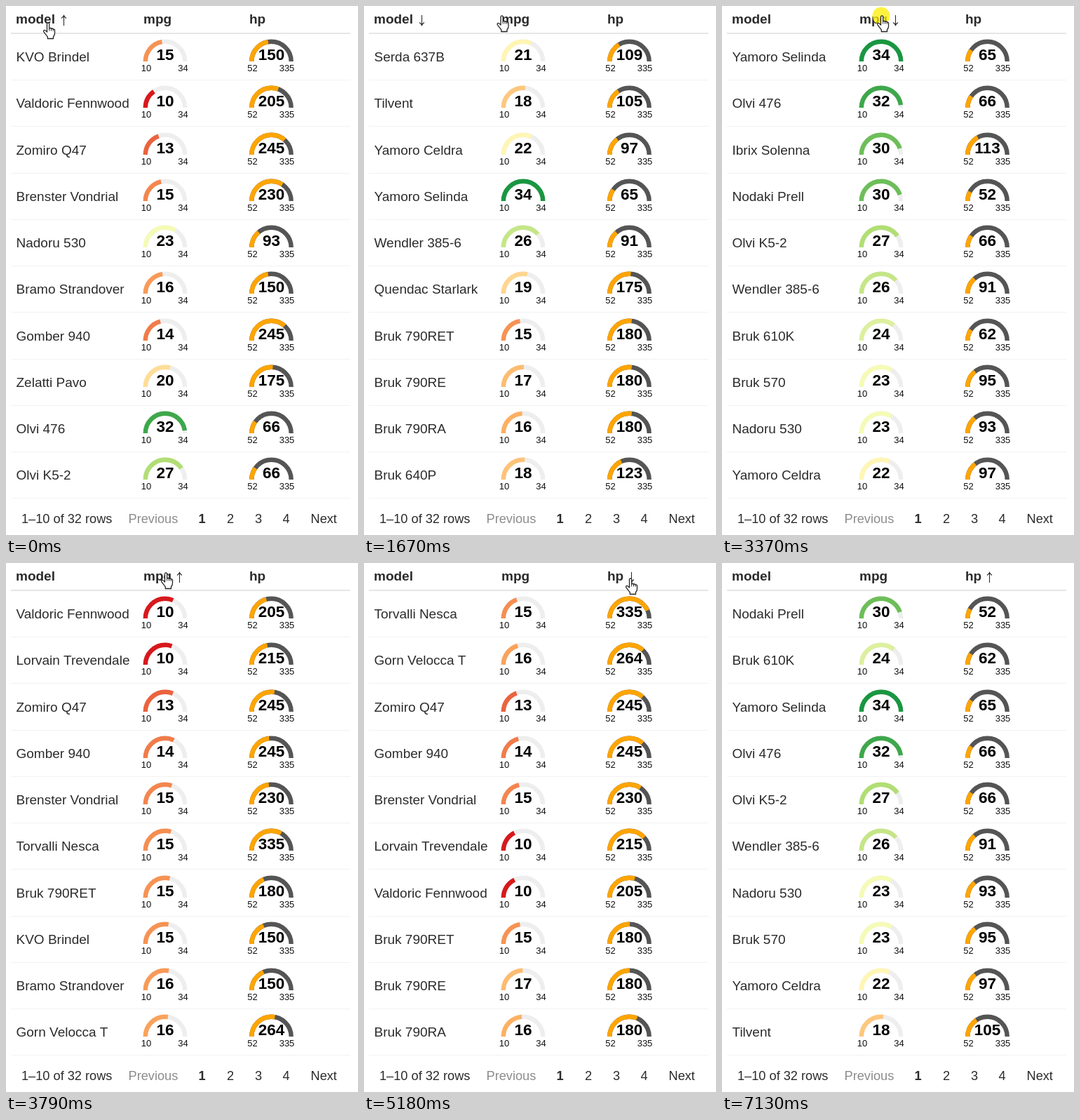
An HTML page with a canvas for the animation above (7.46 s loop, 502 by 754 pixels).

```html
<!DOCTYPE html>
<html lang="en">
<head>
<meta charset="utf-8">
<title>Sortable gauge table</title>
<style>
  html, body { margin: 0; width: 100%; height: 100%; overflow: hidden; background: #fff; }
  canvas { display: block; }
</style>
</head>
<body>
<canvas id="stage" width="502" height="754"></canvas>
<script>
const ctx = document.getElementById('stage').getContext('2d');
const LOOP = 7460;
const ROW_HEIGHT = 66.25;
const INK = '#2b2b2b';

// Alphabetical by the shown column order; decimals also settle ties when sorting.
const cars = [
  ['KVO Brindel', 15.21, 150], ['Valdoric Fennwood', 10.4, 205],
  ['Zomiro Q47', 13.3, 245.1], ['Brenster Vondrial', 14.7, 230],
  ['Nadoru 530', 22.8, 93], ['Bramo Strandover', 15.5, 150],
  ['Gomber 940', 14.3, 245], ['Zelatti Pavo', 19.7, 175],
  ['Olvi 476', 32.4, 66], ['Olvi K5-2', 27.3, 66],
  ['Gorn Velocca T', 15.8, 264], ['Nodaki Prell', 30.4, 52],
  ['Lorvain Trevendale', 10.4, 215], ['Ibrix Solenna', 30.4, 113],
  ['Torvalli Nesca', 15, 335], ['Bruk 570', 22.8, 95],
  ['Bruk 610K', 24.4, 62], ['Bruk 640P', 17.8, 123],
  ['Bruk 790RA', 16.4, 180], ['Bruk 790RE', 17.3, 180],
  ['Bruk 790RET', 15.2, 180], ['Quendac Starlark', 19.2, 175],
  ['Wendler 385-6', 26, 91], ['Yamoro Selinda', 33.9, 65],
  ['Yamoro Celdra', 21.5, 97], ['Tilvent', 18.1, 105],
  ['Serda 637B', 21.4, 109]
].map(([name, mpg, hp], model) => ({ name, model, mpg, hp }));

const columns = {
  model: { x: 14, arrowX: 82.5 },
  mpg: { x: 196, arrowX: 247.5, center: 227, min: 10, max: 33.9, track: '#eee' },
  hp: { x: 347, arrowX: 381.5, center: 378.5, min: 52, max: 335, track: '#555' }
};

function sorted(key, descending) {
  const rows = [...cars].sort((a, b) => a[key] - b[key]);
  if (descending) rows.reverse();
  return rows.slice(0, 10);
}

const states = [
  [0, 'model', false], [390, 'model', true], [2080, 'mpg', true],
  [3480, 'mpg', false], [4800, 'hp', true], [6140, 'hp', false]
].map(([time, key, descending]) => ({ time, key, descending, rows: sorted(key, descending) }));

const clicks = [270, 1980, 3370, 4690, 6080];
const CLICK_LENGTH = 140;

// time, x, y of the pointer's upper left corner
const pointerPath = [
  [1100, 53, 23], [1670, 189.5, 13], [1880, 221, 13], [3850, 221, 13],
  [4070, 250, 26], [4430, 373, 21], [6550, 373, 21], [6920, 425, 52], [7120, 503, 100]
];

const mix = (a, b, p) => a + (b - a) * p;
const clamp = p => Math.max(0, Math.min(1, p));

// CSS "ease": cubic-bezier(.25, .1, .25, 1)
function ease(p) {
  if (p <= 0 || p >= 1) return clamp(p);
  const bezier = (a, b, u) => 3 * a * u * (1 - u) ** 2 + 3 * b * u * u * (1 - u) + u ** 3;
  let low = 0, high = 1;
  for (let i = 0; i < 20; i++) {
    const mid = (low + high) / 2;
    if (bezier(.25, .25, mid) < p) low = mid; else high = mid;
  }
  return bezier(.1, 1, low);
}

const ramp = [[215, 25, 28], [253, 174, 97], [255, 255, 191], [166, 217, 106], [26, 150, 65]];
function mpgColor(mpg) {
  const pos = clamp((mpg - 10.4) / 23.5) * 4;
  const i = Math.min(3, Math.floor(pos));
  return `rgb(${ramp[i].map((c, k) => Math.round(mix(c, ramp[i + 1][k], pos - i)))})`;
}

function text(string, x, y, size, { color = INK, bold = false, align = 'left' } = {}) {
  ctx.font = `${bold ? 'bold ' : ''}${size}px "Liberation Sans", Arial, sans-serif`;
  ctx.fillStyle = color;
  ctx.textAlign = align;
  ctx.fillText(string, x, y);
}

function arc(x, y, fraction, color) {
  ctx.beginPath();
  ctx.arc(x, y, 28.2, Math.PI, Math.PI * (1 + fraction));
  ctx.lineWidth = 6.4;
  ctx.strokeStyle = color;
  ctx.stroke();
}

function gauge(column, value, fraction, color, top) {
  const { center, min, max, track } = column;
  const small = { color: '#111', align: 'center' };
  arc(center, top + 40, 1, track);
  arc(center, top + 40, fraction, color);
  text(Math.round(value), center, top + 38, 22.5, { color: '#000', bold: true, align: 'center' });
  text(min, center - 27, top + 54, 13, small);
  text(Math.round(max), center + (max > 99 ? 22 : 25.5), top + 54, 13, small);
}

function sortArrow(x, descending) {
  ctx.save();
  ctx.translate(x, 20.5);
  if (descending) ctx.scale(1, -1);
  ctx.lineWidth = 1.1;
  ctx.strokeStyle = INK;
  ctx.stroke(new Path2D('M0 7.5V-7M-3.5 -3Q-1 -4.5 0 -7Q1 -4.5 3.5 -3'));
  ctx.restore();
}

const hand = new Path2D('M5.5 14V2.5a1.6 1.6 0 0 1 3.2 0V9q1.5-1.3 2.8.4q1.5-1.1 2.7.5' +
  'q2.3-.4 2.3 1.9v4.2q0 2.8-2 4.8v2.7H6.3v-2.7L1.4 14.7q-1.7-2.5 0-3.2q1.5-.4 4.1 2.5z');
const knuckles = new Path2D('M8.7 9v3.5M11.5 9.5v3M14.2 10v2.7');

function pointerAt(time) {
  const next = pointerPath.findIndex(key => key[0] > time);
  if (next === 0) return pointerPath[0].slice(1);
  if (next < 0) return null;
  const [t0, x0, y0] = pointerPath[next - 1];
  const [t1, x1, y1] = pointerPath[next];
  const p = (time - t0) / (t1 - t0);
  const smooth = p * p * (3 - 2 * p);
  return [mix(x0, x1, smooth), mix(y0, y1, smooth)];
}

function drawPointer(time) {
  const position = pointerAt(time);
  if (!position) return;
  ctx.save();
  ctx.translate(...position);
  if (clicks.some(start => time >= start && time < start + CLICK_LENGTH)) {
    ctx.fillStyle = 'rgba(255, 238, 0, .75)';
    ctx.beginPath();
    ctx.arc(6, 1, 12.5, 0, 2 * Math.PI);
    ctx.fill();
  }
  ctx.fillStyle = '#fff';
  ctx.strokeStyle = '#222';
  ctx.lineWidth = 1.3;
  ctx.lineJoin = 'round';
  ctx.fill(hand);
  ctx.stroke(hand);
  ctx.lineWidth = 1;
  ctx.stroke(knuckles);
  ctx.restore();
}

function drawFooter() {
  const size = 18.2, y = 737;
  text('1–10 of 32 rows', 22, y, size);
  text('Previous', 174.5, y, size, { color: '#8c8c8c' });
  [279.5, 320, 360, 399.5].forEach((x, i) =>
    text(i + 1, x, y, size, { bold: i === 0, align: 'center' }));
  text('Next', 434.5, y, size);
}

function draw(time) {
  const index = states.findLastIndex(state => state.time <= time);
  const state = states[index];
  const before = states[Math.max(0, index - 1)];
  const progress = ease((time - state.time) / 1000);

  ctx.fillStyle = '#fff';
  ctx.fillRect(0, 0, 502, 754);
  for (const [label, { x }] of Object.entries(columns)) text(label, x, 25, 19, { bold: true });
  sortArrow(columns[state.key].arrowX, state.descending);
  ctx.fillStyle = '#e6e6e6';
  ctx.fillRect(7, 38, 484, 2);

  state.rows.forEach((car, i) => {
    const top = Math.round(39 + i * ROW_HEIGHT);
    text(car.name, 14.5, top + 40, 19);
    for (const key of ['mpg', 'hp']) {
      const column = columns[key];
      const fraction = mix(before.rows[i][key], car[key], progress) / column.max;
      const color = key === 'hp' ? '#ffa500' : mpgColor(car.mpg);
      gauge(column, car[key], fraction, color, top);
    }
    ctx.fillStyle = '#f2f2f2';
    ctx.fillRect(7, top + 66, 484, 1);
  });

  drawFooter();
  drawPointer(time);
}

const start = performance.now();
function tick() {
  draw((performance.now() - start) % LOOP);
  requestAnimationFrame(tick);
}
tick();
</script>
</body>
</html>
```
